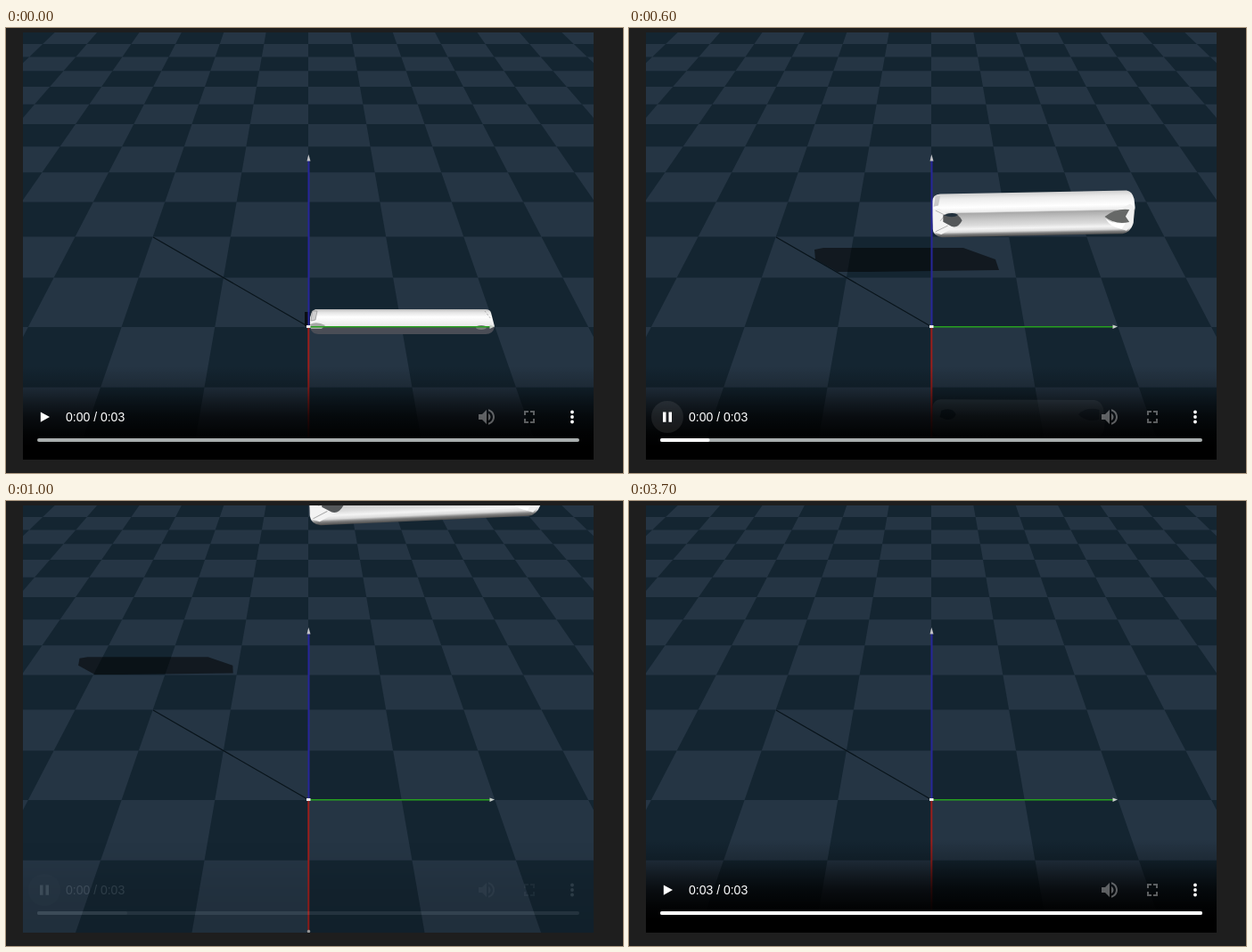
These frames come from a looping animation (692 px wide and 500 px high, 4.5 s). An HTML page:

```html
<!DOCTYPE html>
<html lang="en">
<head>
<meta charset="utf-8">
<title>Floating link simulation</title>
<style>
html, body { margin: 0; width: 100%; height: 100%; overflow: hidden; background: #1e1e1e; }
svg { display: block; width: 692px; height: 500px; }
text { font: 14px "Liberation Sans", Arial, sans-serif; }
</style>
</head>
<body>
<svg viewBox="0 0 692 500">
  <defs>
    <clipPath id="view"><rect x="19" y="5" width="640" height="480"/></clipPath>
    <linearGradient id="metal" x2="0" y2="1">
      <stop offset="0" stop-color="#cfcfcf"/><stop offset=".12" stop-color="#ececec"/>
      <stop offset=".32" stop-color="#fff"/><stop offset=".43" stop-color="#ededed"/>
      <stop offset=".46" stop-color="#a9a9a9"/><stop offset=".6" stop-color="#c6c6c6"/>
      <stop offset=".74" stop-color="#dcdcdc"/><stop offset=".82" stop-color="#f4f4f4"/>
      <stop offset=".89" stop-color="#dadada"/><stop offset=".94" stop-color="#808080"/>
      <stop offset="1" stop-color="#4e4e4e"/>
    </linearGradient>
    <linearGradient id="restMetal" x2="0" y2="1">
      <stop offset="0" stop-color="#b8b8b8"/><stop offset=".15" stop-color="#e0e0e0"/>
      <stop offset=".45" stop-color="#fff"/><stop offset="1" stop-color="#e6e6e6"/>
    </linearGradient>
    <linearGradient id="shade" gradientUnits="userSpaceOnUse" x1="0" y1="380" x2="0" y2="485">
      <stop offset="0" stop-opacity="0"/><stop offset=".23" stop-opacity=".22"/>
      <stop offset=".38" stop-opacity=".5"/><stop offset=".54" stop-opacity=".76"/>
      <stop offset=".72" stop-opacity=".93"/><stop offset=".86" stop-opacity="1"/>
    </linearGradient>
  </defs>
  <rect width="692" height="500" fill="#1e1e1e"/>
  <g clip-path="url(#view)">
    <rect x="19" y="5" width="640" height="480" fill="#142531"/>
    <path id="tiles" fill="#253544"/>
    <path id="mirror" fill="#b4bcc4" fill-opacity=".17" fill-rule="evenodd"/>
    <path id="shadow" fill-opacity=".52"/>
    <path d="M165 235L339 335.5" stroke="#08131a" stroke-width="1.2"/>

    <g id="rest">
      <path d="M335 319h6v16h-6z" fill="#0a0f14"/>
      <path d="M341 336H548Q546 344 538 344H350Q342 343 341 336Z" fill="#4a4d56"/>
      <path d="M341 334Q340 318 347 316H538Q543 316 544 320L548 335.5H341Z" fill="url(#restMetal)"/>
      <path d="M342 329L343.500 318H349L347 328Z" fill="#cfcfcf" stroke="#8e8e8e" stroke-width=".7"/>
      <path d="M341 333Q348 329 358 334L354 338H342Z" fill="#a5a8a5"/>
      <path d="M537 318L544 327" stroke="#aaa" stroke-dasharray="2 2"/>
      <ellipse cx="533" cy="336.500" rx="6" ry="2.500" fill="#777c7a"/>
    </g>

    <g id="link">
      <path id="body" fill="url(#metal)"/>
      <path d="M2 13L4 2H9L7 12Z" fill="#c9c9c9"/>
      <path d="M0 16L8 15L19 23L12 29L24 35L10 42L2 39Z" fill="#f3f3f3"/>
      <path d="M4 17L14 22L9 28M4 39L17 33" fill="none" stroke="#a8a8a8" stroke-width=".8"/>
      <path d="M12 22Q27 17 32 28Q28 36 21 34L12 29Z" fill="#55585a"/>
      <path d="M13 22Q22 18 28 22Q22 26 13 22Z" fill="#22313d"/>
      <path d="M194 21L209 14L213 18L212 34L205 42L190 37Z" fill="#f0f0f0"/>
      <path d="M182 27Q193 18 208 20L204 27L208 33Q193 36 182 27Z" fill="#666867"/>
      <path d="M183 29Q192 36 204 34L200 40Q188 38 183 29Z" fill="#fff"/>
    </g>

    <path d="M339.500 335V149" stroke="#26269a" stroke-width="2"/>
    <path d="M337.500 149.500L339.300 142L341.500 149.500Z" fill="#c4c4c8"/>
    <path d="M339.300 336V483" stroke="#9c1e1c" stroke-width="2"/>
    <circle cx="339.500" cy="483.500" r="1.700" fill="#aaa"/>
    <path d="M340 335.700H544" stroke="#27a01f" stroke-width="1.500"/>
    <path d="M542.500 333.500L548 335.600L542.500 338Z" fill="#c8d0c8"/>
    <path d="M337 334h4.500v3H337z" fill="#eee"/>

    <g id="controls" fill="#fff">
      <path d="M19 380H659V485H19Z" fill="url(#shade)"/>
      <path id="play" d="M38.800 431.500L49 437.100L38.800 442.700Z"/>
      <g id="pause">
        <circle cx="43" cy="437" r="18" fill-opacity=".08"/>
        <path d="M38 431.500h3.500v11.300H38zM44.500 431.500H48v11.300h-3.500z"/>
      </g>
      <text id="clock" x="67" y="442">0:00 / 0:03</text>
      <g fill-opacity=".35">
        <path transform="translate(527 425)" d="M3 9v6h4l5 5V4L7 9H3zm13.500 3c0-1.770-1.020-3.290-2.500-4.030v8.050c1.480-.73 2.500-2.250 2.500-4.020zM14 3.230v2.060c2.890.86 5 3.540 5 6.710s-2.110 5.850-5 6.710v2.060c4.010-.91 7-4.490 7-8.770s-2.990-7.860-7-8.770z"/>
        <path transform="translate(575 425)" d="M8 14H6v5h5v-2H8zM6 10h2V7h3V5H6zM16 17h-3v2h5v-5h-2zM13 5v2h3v3h2V5z"/>
      </g>
      <circle cx="635" cy="431.500" r="1.900"/>
      <circle cx="635" cy="437" r="1.900"/>
      <circle cx="635" cy="442.500" r="1.900"/>
      <rect x="35" y="461" width="608" height="4" rx="2" fill="#a9aeae"/>
      <rect id="played" x="35" y="461" height="4" rx="2"/>
    </g>
  </g>
</svg>
<script>
const LOOP = 4500, STEP = 100;
const CX = 339, HORIZON = -268.6;
const OUTLINE = 'M0 9Q1 0 9 0H205Q211 1 213 9L214 18L212 35Q209 44 201 45H11Q2 44 1 36Z';
const HOLES = 'M10 23Q25 15 30 26Q26 36 12 31ZM181 27Q193 16 207 21V33Q191 37 181 27Z';
const SHADOW = [[208, 249], [218, 247], [375, 247], [411, 260], [415, 272], [270, 274], [234, 274], [209, 260]];

const $ = id => document.getElementById(id);
const show = (id, on) => $(id).setAttribute('display', on ? 'inline' : 'none');

// Floor coordinates: x is lateral slope, q is inverse height below the horizon.
const project = ([x, q]) => [CX + x / q * q / q * q, 0] && [x, q];
const toFloor = (x, y) => [(x - CX) / (y - HORIZON), 1 / (y - HORIZON)];
const toScreen = (x, q) => [CX + x / q, HORIZON + 1 / q];
const polygon = points => 'M' + points.map(p => p.map(n => n.toFixed(2)).join(' ')).join('L') + 'Z';

function drawTiles() {
  const depth = k => 0.001654 + 0.0001668 * k;
  const side = 0.1732;
  let d = '';
  for (let k = -2; k < 13; k++) {
    for (let c = -8; c < 8; c++) {
      if (!((k + c) & 1)) continue;
      const corners = [[c, k], [c + 1, k], [c + 1, k + 1], [c, k + 1]];
      d += polygon(corners.map(([i, j]) => {
        const y = HORIZON + 1 / depth(j);
        return [CX + i * side * (y - HORIZON), y];
      }));
    }
  }
  $('tiles').setAttribute('d', d);
}

const scaleAt = m => 0.004695 / (0.004695 - 0.00029 * m);
const setMatrix = (id, ...m) => $(id).setAttribute('transform', `matrix(${m.join(' ')})`);

function drawLink(t) {
  const m = (t - 400) / 200;
  const s = scaleAt(m);
  const top = 275 - 1340 * (s - 1);
  const bottom = 320 - 1285 * (s - 1);
  setMatrix('link', s, -(1 + 3.5 * m) / 213, 0, (bottom - top) / 45, CX + 0.5, top);

  const r = scaleAt(-0.64 - m);
  const middle = 362 + 1400 * (0.962 - r);
  setMatrix('mirror', r, 0.005, 0, -0.9, CX + 0.5, middle + 20);

  const n = (t - 600) / 200;
  $('shadow').setAttribute('d', polygon(SHADOW.map(([x, y]) => {
    const [fx, q] = toFloor(x, y);
    // The floor point slides away from the light at constant speed.
    const depth = q + 0.000157 * n;
    const px = CX + (fx - 0.1615 * n) / depth * 1;
    return [px, HORIZON + 1 / depth];
  })));
}

function playedWidth(t) {
  if (t < 400) return 0;
  if (t < 600) return 6;
  if (t < 900) return 55.5;
  return t < 3700 ? 101 : 608;
}

function render(now) {
  const t = Math.floor(now % LOOP / STEP) * STEP;
  const moving = t >= 400 && t < 1500;
  const ended = t >= 3700;
  const paused = t < 400 || ended;

  show('rest', t < 400);
  for (const id of ['link', 'mirror', 'shadow']) show(id, moving);
  if (moving) drawLink(t);

  const fade = Math.min(1, Math.max(0, (t - 600) / 500));
  $('controls').setAttribute('opacity', paused ? 1 : Math.pow(1 - fade, 1.4));
  show('play', paused);
  show('pause', !paused);
  $('played').setAttribute('width', playedWidth(t));
  $('clock').textContent = `0:0${ended ? 3 : 0} / 0:03`;
}

drawTiles();
$('body').setAttribute('d', OUTLINE);
$('mirror').setAttribute('d', OUTLINE + HOLES);

const start = performance.now();
function tick() {
  render(performance.now() - start);
  requestAnimationFrame(tick);
}
tick();
</script>
</body>
</html>
```
